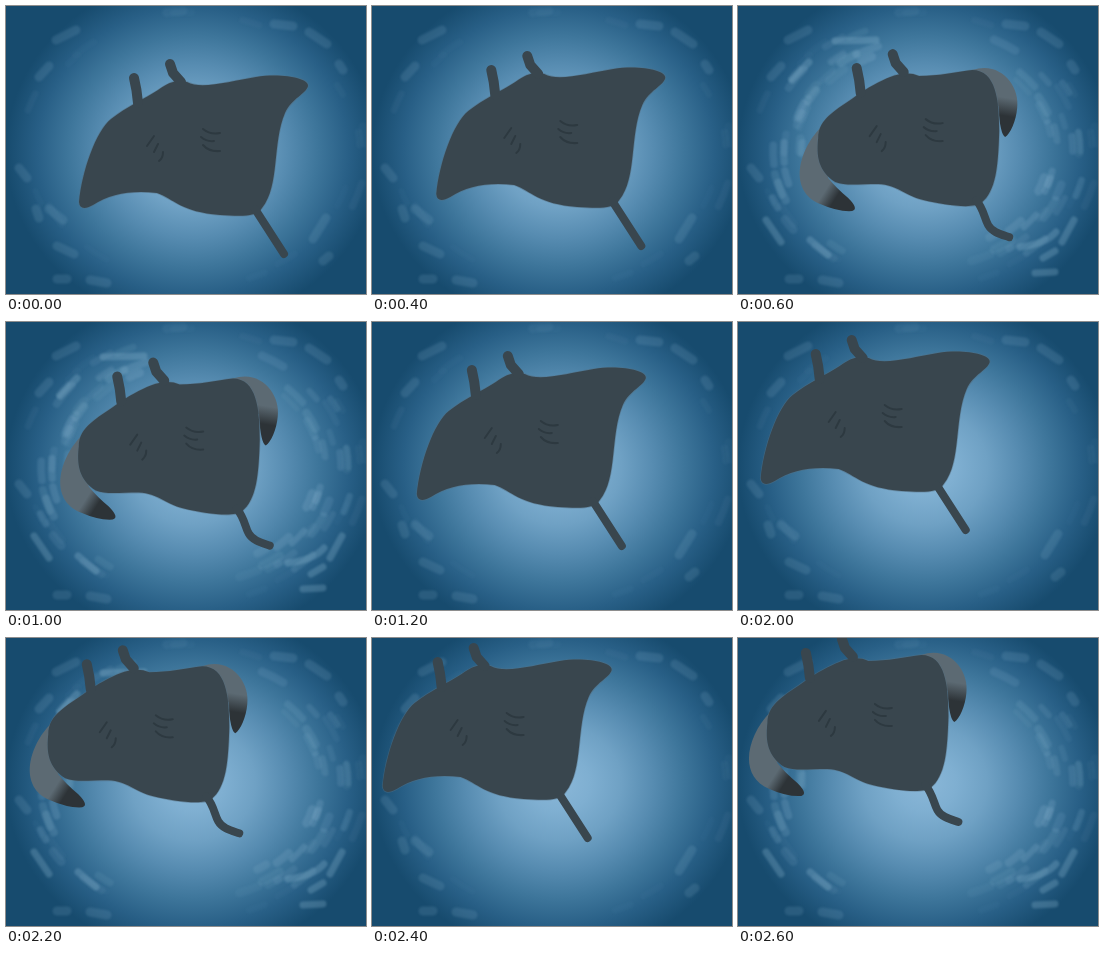
An HTML page with a canvas for the animation above (2800 ms loop, 360x288 px).

```html
<!DOCTYPE html>
<html lang="en">
<head>
<meta charset="utf-8">
<title>Manta ray</title>
<style>
html, body { margin: 0; width: 100%; height: 100%; overflow: hidden; background: #174b6e; }
canvas { display: block; }
</style>
</head>
<body>
<canvas id="stage" width="360" height="288"></canvas>
<script>
const ctx = document.getElementById('stage').getContext('2d');
const STEP = 200, STEPS = 14;
const CENTER = { x: 187, y: 145 };

const glow = ctx.createRadialGradient(0, 0, 0, 0, 0, 1);
['#8ab7d8', '#7fafd1', '#6fa1c4', '#578cb1', '#3e769b', '#285f86', '#174b6e']
  .forEach((color, i) => glow.addColorStop(i / 6, color));

// Parts of the manta: the gliding pose, the curled pose, and what both share
const glideBody = new Path2D(`M73 196C76 165 90 125 105 113S140 92 152 84S168 74 181 76
  C195 84 225 75 250 71S303 72 302 80C300 88 286 92 279 107C266 137 274 180 256 202
  C250 212 232 210 214 209C175 206 168 193 151 187C125 184 104 188 87 199Q74 206 73 196Z`);
const curlBody = new Path2D(`M80 132C80 112 100 103 115 92S142 75 152 71S172 66 181 70
  C200 70 218 66 234 64C258 64 261 95 261 125C260 160 258 185 243 197
  C235 203 205 199 185 194C165 189 160 179 140 178C120 178 107 180 97 176C80 165 78 150 80 132Z`);
const rightWing = new Path2D('M234 64C262 54 282 80 279 102C278 115 272 128 267 131Q262 129 260 100Z');
const leftWing = new Path2D('M82 122C60 145 50 185 82 198Q100 206 114 205Q121 203 110 192Q98 182 90 172Z');
const glideTail = new Path2D('M249 203L278 248');
const curlTail = new Path2D('M238 194C246 204 246 212 250 219S262 228 271 231');
const horns = new Path2D('M132 97Q131 84 128 72M164 58L167 67L175 76');
const gills = new Path2D(`M197 123Q204 129 214 127M195 131Q201 136 208 135M197 139Q203 146 214 145
  M141 140L148 130M148 146L152 138M153 155Q157 152 157 146`);

const landmarks = new Path2D(`M50 34L70 24M13 162L21 172M51 273H61M84 274L101 277M268 18L287 20
  M303 26L321 38M333 58L337 64M33 71L43 60`);
const calmMarks = new Path2D('M30 203L33 212M43 203L57 214M51 240L68 248M307 233L320 212M317 255L323 250');
const busyMarks = new Path2D(`M97 35L138 34M54 74L71 56M28 214L43 236M324 236L336 214M305 252L317 245
  M297 267L317 266M72 234L90 249M282 241Q308 238 318 226`);

function seeded(seed) {
  return () => {
    const v = Math.sin(seed++ * 12.9898) * 43758.5453;
    return v - Math.floor(v);
  };
}

function stroke(path, width, style) {
  ctx.lineWidth = width;
  ctx.strokeStyle = style;
  ctx.stroke(path);
}

function fill(path, style) {
  ctx.fillStyle = style;
  ctx.fill(path);
}

const foam = alpha => `rgba(155,195,220,${alpha})`;

// Short arcs that circle the light, gathered left and right by a narrow spread
function swirl(count, spread, inner, outer, alpha, seed) {
  const random = seeded(seed);
  for (let n = 0; n < count; n++) {
    const angle = n % 2 * Math.PI + (random() - .5) * spread;
    const r = inner + (outer - inner) * random();
    const path = new Path2D();
    path.ellipse(CENTER.x, CENTER.y, 170 * r, 140 * r, 0, angle, angle + .08 + .1 * random());
    stroke(path, 6 + 3 * random(), foam(alpha * (.5 + random())));
  }
}

function drawWater(curled) {
  ctx.save();
  ctx.translate(CENTER.x, CENTER.y);
  ctx.scale(187, 173);
  ctx.fillStyle = glow;
  ctx.fillRect(-2, -2, 4, 4);
  ctx.restore();

  ctx.save();
  ctx.filter = 'blur(1px)';
  stroke(landmarks, 9, foam(.15));
  swirl(16, 3, .92, 1.02, .05, 5);
  if (curled) {
    swirl(60, 2.3, .72, .96, .13, 40);
    stroke(busyMarks, 7, foam(.26));
  } else {
    stroke(calmMarks, 9, foam(.14));
  }
  ctx.restore();
}

function wing(path, x0, y0, x1, y1) {
  const shade = ctx.createLinearGradient(x0, y0, x1, y1);
  shade.addColorStop(0, '#5c6a73');
  shade.addColorStop(1, '#2d3337');
  fill(path, shade);
}

function drawBody(body, tail) {
  stroke(body, 1.5, 'rgba(85,110,128,.5)');
  fill(body, '#39464e');
  stroke(tail, 8, '#39464e');
}

function drawManta(curled, i) {
  ctx.save();
  if (curled) {
    ctx.translate(-.7 - 2.36 * i - .17 * i * i, -.4 - 2.8 * i - .12 * i * i);
    ctx.save();
    ctx.translate(9.5, 10);
    wing(rightWing, 271, 92, 268, 110);
    wing(leftWing, 86, 186, 97, 193);
    drawBody(curlBody, curlTail);
    ctx.restore();
  } else {
    ctx.translate(-4.2 * i - .083 * i * i, -4 * i);
    drawBody(glideBody, glideTail);
  }
  stroke(horns, 10, '#39464e');
  stroke(gills, 2, '#2d3940');
  ctx.restore();
}

let shown = -1;
function draw() {
  const i = Math.floor(performance.now() / STEP) % STEPS;
  if (i !== shown) {
    shown = i;
    const curled = i % 2 === 1;
    ctx.lineCap = ctx.lineJoin = 'round';
    drawWater(curled);
    drawManta(curled, i);
  }
  requestAnimationFrame(draw);
}
draw();
</script>
</body>
</html>
```
